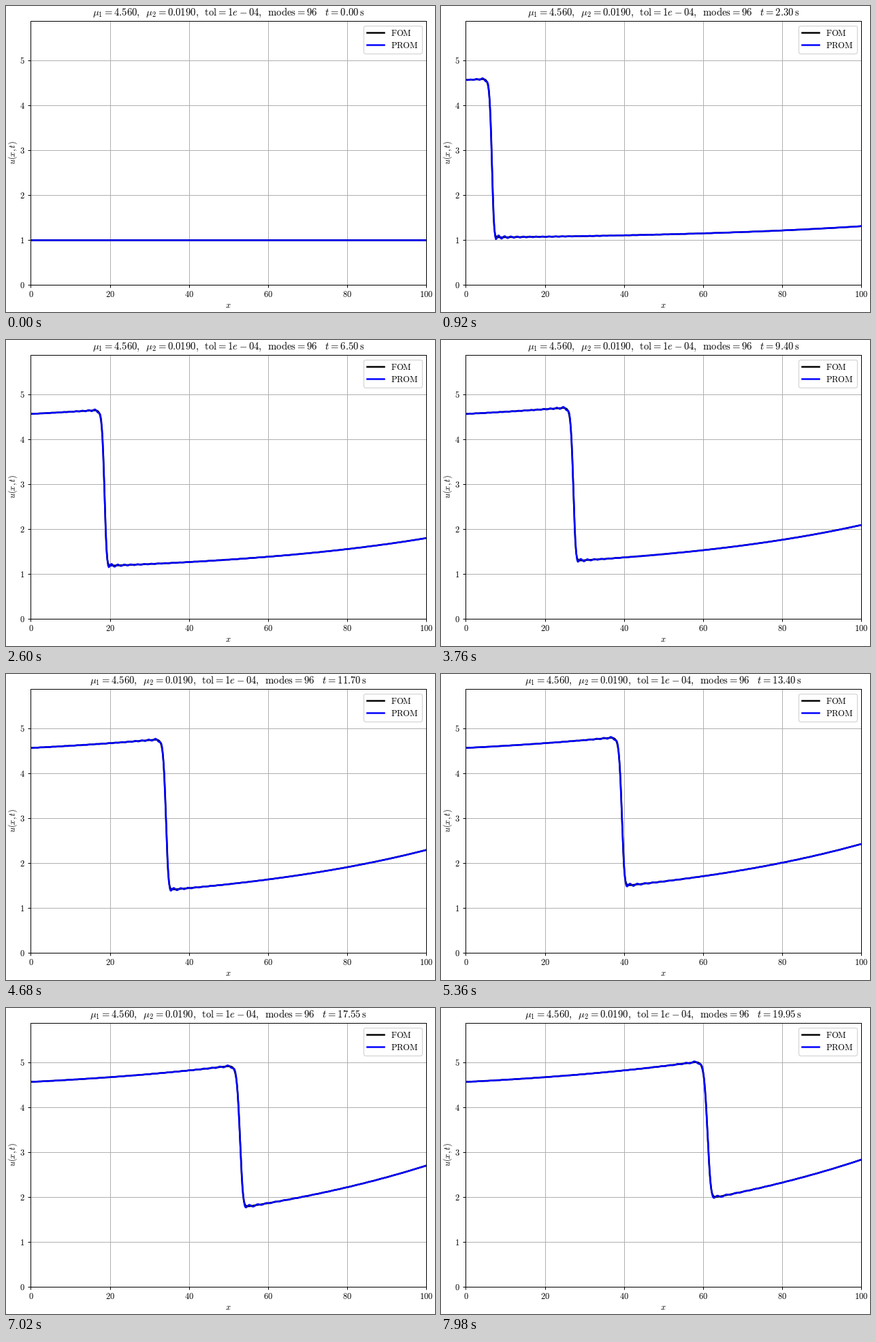
Recreate the animation shown at these times as a matplotlib script. Size 630 by 450 pixels, loop 8000 ms.

```python
import numpy as np
import matplotlib.pyplot as plt
from matplotlib.animation import FuncAnimation

plt.rcParams["mathtext.fontset"] = "cm"

W, H, DPI = 630, 450, 90
FRAMES, INTERVAL = 400, 20
CELLS, STEPS, DT, LENGTH = 512, 500, 0.05, 100.0
MU1, MU2, MODES = 4.56, 0.019, 96

x = np.linspace(0, LENGTH, CELLS + 1)


def solve(mu1, mu2):
    """Implicit upwind Burgers for several parameter pairs, swept by diagonals."""
    c = DT / (x[1] - x[0])
    src = 0.02 * np.exp(np.outer(x, mu2)) * DT
    u = np.ones((STEPS + 1, CELLS + 1, len(mu1)))
    u[1:, 0] = mu1
    for d in range(2, STEPS + CELLS + 1):
        n = np.arange(max(1, d - CELLS), min(STEPS, d - 1) + 1)
        i = d - n
        rhs = u[n - 1, i] + 0.5 * c * u[n, i - 1] ** 2 + src[i]
        u[n, i] = (np.sqrt(1 + 2 * c * rhs) - 1) / c
    return u


# Nine training pairs, then the pair on show
grid1, grid2 = np.meshgrid([4.25, 4.875, 5.5], [0.015, 0.0225, 0.03])
sol = solve(np.append(grid1, MU1), np.append(grid2, MU2))
snaps = sol[:, :, :-1].transpose(1, 0, 2).reshape(CELLS + 1, -1)
basis = np.linalg.eigh(snaps @ snaps.T)[1][:, -MODES:]
full = sol[:FRAMES, :, -1]
reduced = full @ basis @ basis.T
reduced[0] = 1.0

fig = plt.figure(figsize=(W / DPI, H / DPI), dpi=DPI, facecolor="white")
left, right, top, bottom = 36.4, 616.9, 22.3, 409.6
ax = fig.add_axes([left / W, 1 - bottom / H, (right - left) / W, (bottom - top) / H])
ax.set_xlim(0, LENGTH)
ax.set_ylim(0, 5.87)
ax.set_xticks(range(0, 101, 20), [f"${v}$" for v in range(0, 101, 20)])
ax.set_yticks(range(6), [f"${v}$" for v in range(6)])
ax.grid(True)

fom, = ax.plot(x, full[0], color="black", lw=2, label=r"$\mathrm{FOM}$")
prom, = ax.plot(x, reduced[0], color="blue", lw=2, label=r"$\mathrm{PROM}$")
ax.legend(loc="upper right", labelspacing=0.4)


def label(px, py, text, size=10, **kw):
    return fig.text(px / W, 1 - py / H, text, fontsize=size, ha="center", **kw)


label(326.6, 443.5, "$x$", va="baseline")
label(10, 216, "$u(x,t)$", va="center", rotation=90)
title = label(326.6, 14, "", 11.75, va="baseline")


def update(k):
    fom.set_ydata(full[k])
    prom.set_ydata(reduced[k])
    title.set_text(
        rf"$\mu_1={MU1:.3f},\;\;\mu_2={MU2:.4f},\;\;\mathrm{{tol}}=1e-04,"
        rf"\;\;\mathrm{{modes}}={MODES}\quad t={k * DT:.2f}\,\mathrm{{s}}$")
    return fom, prom, title


anim = FuncAnimation(fig, update, frames=FRAMES, interval=INTERVAL,
                     repeat=True, repeat_delay=0, blit=False)
plt.show()
```
